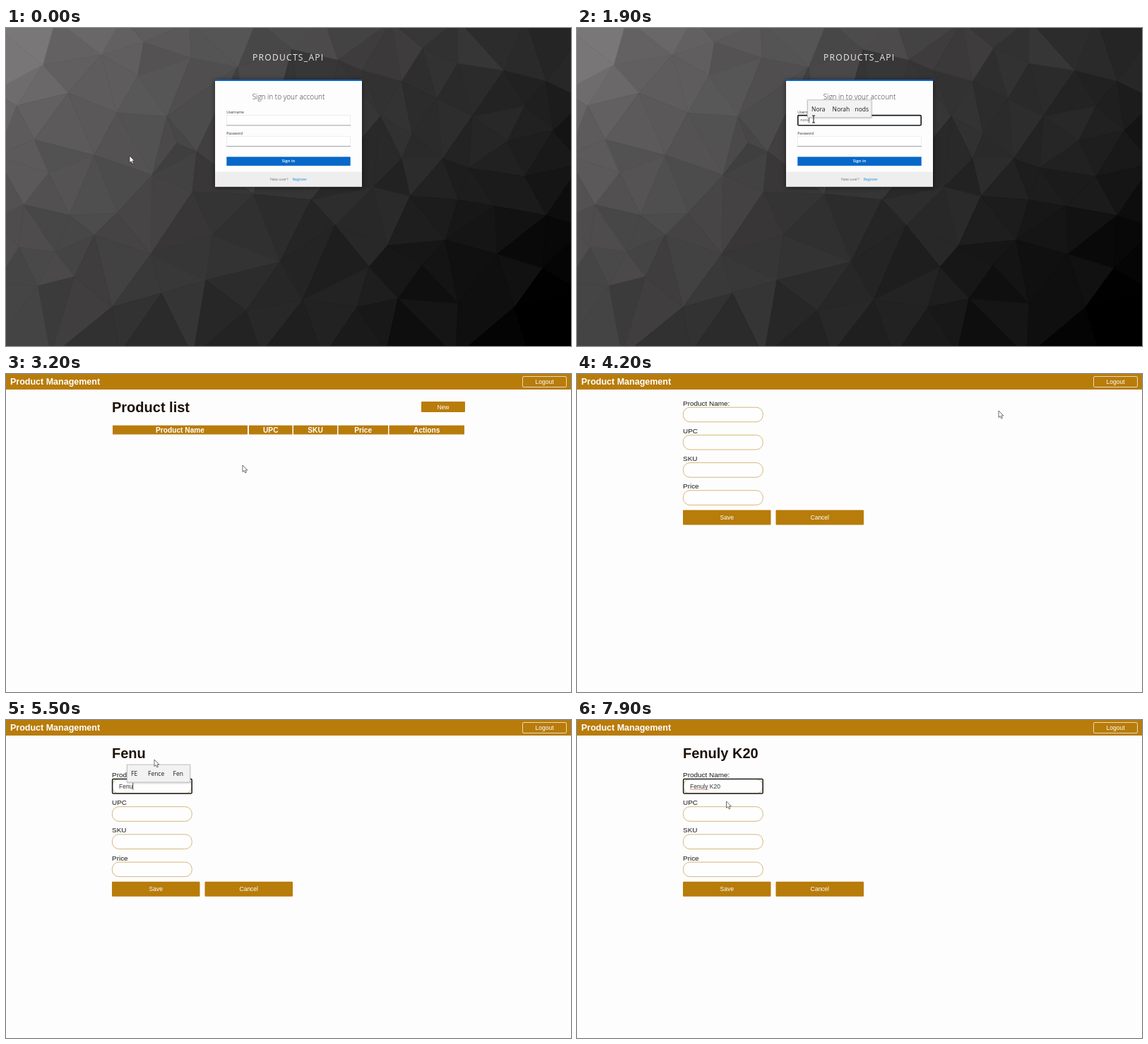
These frames come from a looping animation (800x450 px, 8000 ms). An HTML page:

```html
<!DOCTYPE html>
<html lang="en">
<head>
<meta charset="utf-8">
<title>Product Management</title>
<style>
  html, body { margin: 0; width: 100%; height: 100%; overflow: hidden; background: #000; }
  svg { display: block; width: 100vw; height: 100vh; }
  text { white-space: pre; }
  .open { font-family: "Open Sans", sans-serif; }
  .arial { font-family: "Liberation Sans", Arial, sans-serif; }
</style>
</head>
<body>
<svg viewBox="0 0 800 450">
  <g id="backdrop"></g>
  <g id="scene"></g>
  <g id="pointer"></g>
</svg>
<script>
const LOOP = 8000, STEP = 100;
const GOLD = '#b87c0b', BLUE = '#0768c9', PAPER = '#fefdfd';
const USER = 'nora', PRODUCT = 'Fenuly K20';
const USER_KEYS = [1400, 1500, 1600, 1800];
const PASS_KEYS = [2400, 2500, 2700, 2800];
const NAME_KEYS = [5200, 5300, 5400, 5500, 5700, 5900, 6100, 6400, 6700, 7000];
// time, x, y of the pointer
const PATH = [
  [0, 175, 181], [800, 335, 129], [3600, 335, 129], [4000, 597, 52],
  [4200, 597, 52], [4600, 210, 56], [7000, 210, 56], [7500, 211.5, 115]
];

const byId = id => document.getElementById(id);
const pen = document.createElement('canvas').getContext('2d');

function rect(x, y, w, h, fill, more = '') {
  return `<rect x="${x}" y="${y}" width="${w}" height="${h}" fill="${fill}" ${more}/>`;
}
function text(str, x, y, size, fill, cls = 'arial', more = '') {
  return `<text x="${x}" y="${y}" font-size="${size}" fill="${fill}" class="${cls}" ${more}>${str}</text>`;
}
function line(x1, y1, x2, y2, color, width = 1) {
  return `<path d="M${x1} ${y1}L${x2} ${y2}" stroke="${color}" stroke-width="${width}"/>`;
}
const MID = 'text-anchor="middle"';
const MID_BOLD = MID + ' font-weight="700"';

function widthOf(str, font) {
  pen.font = '100px ' + font;
  return pen.measureText(str).width / 100;
}
const typed = (str, keys, t) => str.slice(0, keys.filter(k => k <= t).length);

// Low-poly backdrop: Delaunay mesh over scattered points, shaded by a diagonal ramp
const POINTS = [
  52,52, 88,92, 135,38, 187,67, 195,20, 262,42, 328,55, 405,30, 470,45, 505,60,
  560,75, 590,28, 640,50, 705,60, 765,75, 15,110, 40,158, 157,120, 228,125, 530,125,
  575,150, 610,100, 660,125, 735,110, 775,145, 710,160, 60,205, 125,180, 207,208, 242,163,
  270,175, 264,232, 560,185, 618,185, 655,198, 735,210, 520,225, 25,250, 90,265, 157,262,
  350,235, 432,243, 466,279, 572,238, 640,243, 692,252, 765,265, 18,310, 70,317, 125,293,
  205,320, 292,293, 388,331, 540,308, 514,338, 589,336, 622,300, 695,320, 760,340, 45,365,
  97,352, 150,395, 220,375, 283,357, 340,400, 420,385, 497,395, 555,383, 640,390, 720,395
];

function meshPoints() {
  const pts = [];
  for (let i = 0; i < POINTS.length; i += 2) pts.push([POINTS[i], POINTS[i + 1]]);
  for (let i = 0; i < 10; i++) {
    const x = -25 + i * 95;
    pts.push([x, -9 - i % 3 * 3], [x + 7 * Math.sin(i * 5), 460 + i % 2 * 5]);
  }
  for (let i = 1; i < 5; i++) pts.push([-14 - i % 2 * 5, i * 90], [815 + i % 2 * 6, i * 90 + 12]);
  return pts;
}

function circle(a, b, c) {
  const d = 2 * (a[0] * (b[1] - c[1]) + b[0] * (c[1] - a[1]) + c[0] * (a[1] - b[1]));
  if (Math.abs(d) < 1) return null;
  const sq = p => p[0] * p[0] + p[1] * p[1];
  const x = (sq(a) * (b[1] - c[1]) + sq(b) * (c[1] - a[1]) + sq(c) * (a[1] - b[1])) / d;
  const y = (sq(a) * (c[0] - b[0]) + sq(b) * (a[0] - c[0]) + sq(c) * (b[0] - a[0])) / d;
  return [x, y, (a[0] - x) ** 2 + (a[1] - y) ** 2];
}

function shade(x, y) {
  const s = Math.sin(x * 12.9 + y * 78.2) * 43758;
  const noise = (s - Math.floor(s) - 0.5) * 13;
  const glow = 14 * Math.exp(-(x * x + y * y) / 9000);
  const v = Math.max(0, 110 - 0.087 * x - 0.1 * y + glow + noise);
  return `rgb(${[v, v * 0.98, v * 0.985].map(Math.round)})`;
}

function backdrop() {
  const pts = meshPoints(), n = pts.length;
  let out = '';
  for (let i = 0; i < n; i++)
    for (let j = i + 1; j < n; j++)
      for (let k = j + 1; k < n; k++) {
        const tri = [pts[i], pts[j], pts[k]];
        const c = circle(...tri);
        if (!c || pts.some(p => (p[0] - c[0]) ** 2 + (p[1] - c[1]) ** 2 < c[2] - 0.01)) continue;
        const mid = a => tri.reduce((sum, p) => sum + p[a], 0) / 3;
        const color = shade(mid(0), mid(1));
        out += `<path d="M${tri.join('L')}Z" fill="${color}" stroke="${color}" stroke-width=".7"/>`;
      }
  return out;
}

function popup(x, y, w, words) {
  return rect(x, y, w, 24.8, '#f2f2f2', 'stroke="#c4c4c4" style="filter:drop-shadow(0 1px 1px #0003)"') +
    words.map(([word, dx]) => text(word, x + dx, y + 16, 8.5, '#1c1c1c', 'open')).join('');
}

function loginField(y, focus, hover) {
  if (focus) return rect(312.8, y, 174.4, 14.2, '#fff', 'rx="1.3" stroke="#14181c" stroke-width="1.6"');
  return rect(312.5, y, 175, 14, '#fff', 'stroke="#e9e9e9" stroke-width=".8"') +
    line(312, y + 14.2, 488, y + 14.2, hover ? '#1a6fc0' : '#8f9194', hover ? 1.2 : 0.8);
}

function login(t) {
  const onUser = t >= 900 && t < 2000, onPass = t >= 2000, sent = t >= 3000;
  const user = typed(USER, USER_KEYS, t);
  const dots = typed('****', PASS_KEYS, t).length;
  let s = text('PRODUCTS_API', 349, 46, 12.1, '#ececec', 'open', 'letter-spacing="1.25"');
  s += rect(296, 73, 208, 151.5, PAPER, 'style="filter:drop-shadow(0 1px 3px #0008)"');
  s += rect(296, 73, 208, 2, BLUE) + rect(296, 203.5, 208, 21, '#efeeee');
  s += text('Sign in to your account', 400, 101, 10, '#363636', 'open', MID + ' font-weight="300"');
  s += text('Username', 312.3, 121, 5.1, '#333', 'open') + text('Password', 312.3, 150.6, 5.1, '#333', 'open');
  s += loginField(123.6, onUser, t >= 700) + loginField(153.2, onPass);
  s += text(user, 316.3, 132.3, 5.4, '#444', 'open');
  if (onUser && (t < 1200 || t >= 1400)) {
    const x = 317 + widthOf(user, '"Open Sans", sans-serif') * 5.4;
    s += line(x, 127, x, 134.5, '#222', 0.7);
  }
  for (let i = 0; i < dots; i++) s += `<circle cx="${318 + i * 2.45}" cy="160.3" r="1" fill="#222"/>`;
  if (onPass) s += line(317 + dots * 2.3, 157, 317 + dots * 2.3, 164, '#222', 0.7);
  if (dots) s += `<path d="M475 161Q479 155.5 483 161M476 163L477 161.5M482 163L481 161.5" fill="none" stroke="#333" stroke-width=".8"/>
    <circle cx="479" cy="161.2" r="1.6" fill="none" stroke="#333" stroke-width=".8"/>`;
  s += rect(312.3, 182.3, 175.4, 12.6, sent ? '#cfcfcf' : BLUE);
  s += text('Sign in', 400, 190.1, 5.8, sent ? '#777' : '#fff', 'open', MID + (sent ? '' : ' font-weight="600"'));
  s += text('New user?', 374, 216, 5.3, '#72767b', 'open') + text('Register', 405.8, 216, 5.3, '#1688d8', 'open');
  if (t >= 1800 && onUser) s += popup(326.5, 101.8, 90.5, [['Nora', 5.5], ['Norah', 35], ['nods', 67]]);
  return s;
}

function page() {
  return rect(0, 0, 800, 450, PAPER) + rect(0, 0, 800, 22, GOLD) +
    text('Product Management', 6, 15.1, 12.5, '#fff', 'arial', 'font-weight="700"') +
    rect(731.5, 3.5, 62, 15, 'none', 'rx="1.5" stroke="#ead9b4"') +
    text('Logout', 762.5, 14, 8.5, '#fff', 'arial', MID);
}

function button(label, x, y, w, h) {
  return rect(x, y, w, h, GOLD, 'rx="1"') + text(label, x + w / 2, y + h / 2 + 3, 8.5, '#fff', 'arial', MID);
}
const heading = str => text(str, 150, 53.8, 20, '#1c1208', 'arial', 'font-weight="700"');

function list() {
  const cols = [['Product Name', 151, 342], ['UPC', 344, 405.5], ['SKU', 407, 469],
    ['Price', 470.5, 541], ['Actions', 542.5, 649]];
  return page() + heading('Product list') + button('New', 588, 39, 62, 15) +
    cols.map(([name, a, b]) => rect(a, 72.7, b - a, 12.8, GOLD) +
      text(name, (a + b) / 2, 82.6, 10.2, '#fff', 'arial', MID_BOLD)).join('');
}

function form(t) {
  const name = typed(PRODUCT, NAME_KEYS, t);
  const drop = name ? 36.3 : 0, focus = t >= 4800;
  let s = page() + heading(name);
  ['Product Name:', 'UPC', 'SKU', 'Price'].forEach((label, i) => {
    const y = 47.2 + drop + i * 39.2;
    s += text(label, 150, y - 2.6, 9.95, '#1a1a1a');
    s += rect(150.4, y, 112.8, 20.6, '#fffefe', 'rx="9.5" stroke="#d2b87c"');
    if (focus && !i) s += rect(150.6, y, 112.6, 20.6, 'none', 'rx="1.5" stroke="#1a1a1a" stroke-width="1.5"');
  });
  s += button('Save', 150, 192.5 + drop, 124.5, 21) + button('Cancel', 281.5, 192.5 + drop, 124.5, 21);
  const base = 60.6 + drop;
  s += text(name, 160, base, 8.5, '#333');
  const em = str => widthOf(str, '"Liberation Sans", Arial, sans-serif') * 8.5;
  const last = NAME_KEYS.filter(k => k <= t).pop() || 4800;
  if (focus && Math.floor((t - last) / 500) % 2 === 0) {
    const x = 160.4 + em(name);
    s += line(x, base - 8, x, base + 2, '#222', 0.8);
  }
  if (name.includes(' ')) {
    const waves = Math.round(em(name.split(' ')[0]) / 2);
    s += `<path d="M160 ${base + 1.4}${'q.5 -1 1 0t1 0'.repeat(waves)}" fill="none" stroke="#d8603c" stroke-width=".8"/>`;
  }
  if (t >= 5400 && t < 6100) s += popup(171.5, 63.2, 89, [['FE', 5.5], ['Fence', 29.5], ['Fen', 65]]);
  return s;
}

function pointer(t) {
  let i = PATH.length - 1;
  while (PATH[i][0] > t) i--;
  const a = PATH[i], b = PATH[i + 1] || a;
  const u = b === a ? 0 : (t - a[0]) / (b[0] - a[0]), e = u * u * (3 - 2 * u);
  const x = a[1] + (b[1] - a[1]) * e, y = a[2] + (b[2] - a[2]) * e;
  const overField = t < 3000 ? t >= 700 :
    t >= 4100 && x > 150 && x < 263 && (t < 5200 ? y > 47 && y < 68 : y > 83 && y < 104);
  const shape = overField
    ? '<path d="M-2 -5H2M-2 5H2M0 -5V5" fill="none" stroke="#111"/>'
    : '<path d="M0 0V9.6L2.2 7.6L3.8 11L5.4 10.2L3.9 7H6.8Z" fill="#fff" stroke="#333" stroke-width=".7"/>';
  return `<g transform="translate(${x} ${y})">${shape}</g>`;
}

let shown = -1;
function update(now) {
  const t = Math.floor(now % LOOP / STEP) * STEP;
  if (t !== shown) {
    shown = t;
    byId('scene').innerHTML = t < 3200 ? login(t) : t < 4100 ? list() : form(t);
    byId('pointer').innerHTML = pointer(t);
  }
}

byId('backdrop').innerHTML = backdrop();
const start = performance.now();
function tick() {
  update(performance.now() - start);
  requestAnimationFrame(tick);
}
tick();
</script>
</body>
</html>
```
